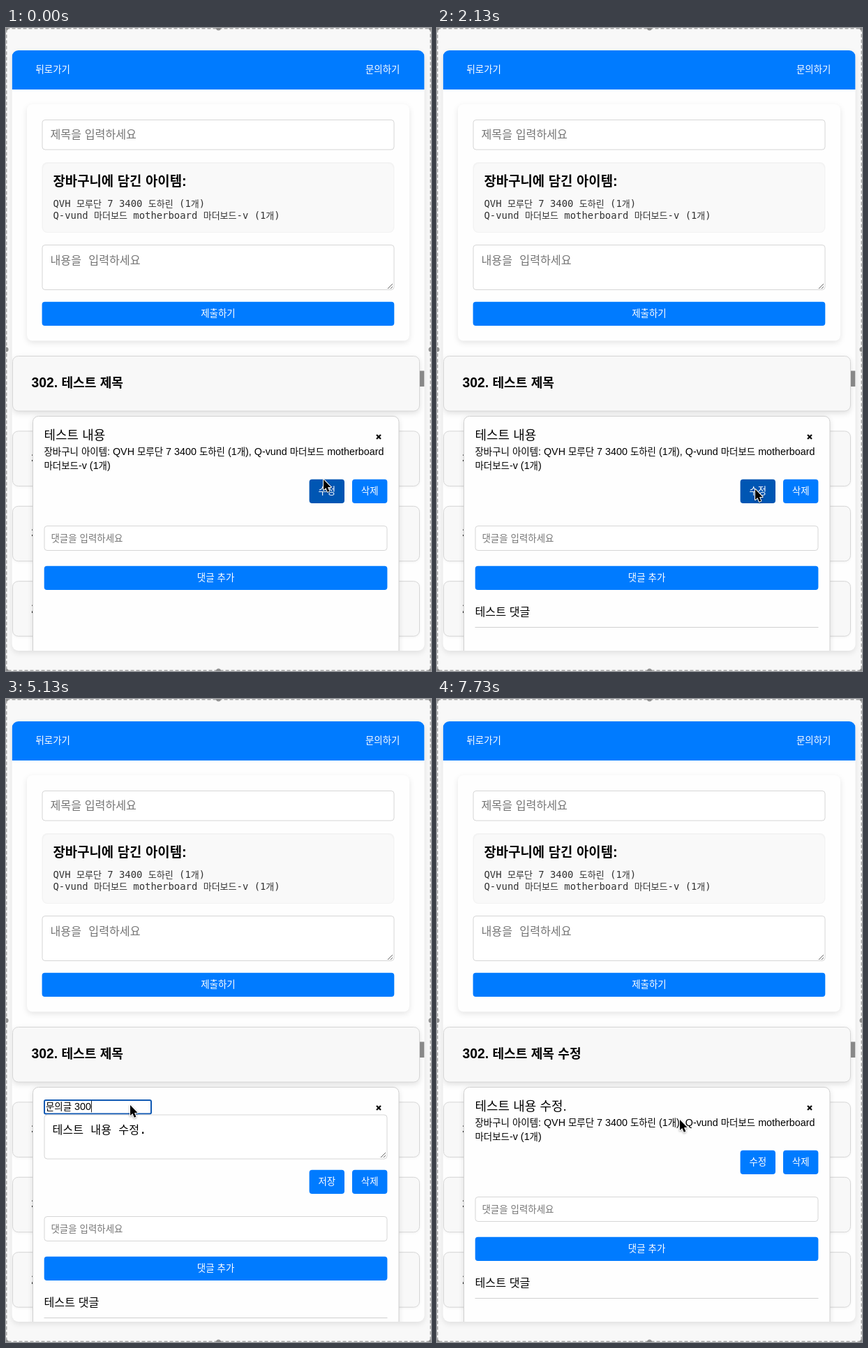
Animation of 609 by 920 pixels, one loop 8 s. Source, as an HTML page with a canvas:

```html
<!DOCTYPE html>
<html lang="ko">
<head>
<meta charset="utf-8">
<title>문의 게시판</title>
<style>
  html, body { margin: 0; width: 100%; height: 100%; overflow: hidden; background: #f8f8f8; }
  canvas { display: block; width: 609px; height: 920px; }
</style>
</head>
<body>
<canvas id="stage"></canvas>
<script>
const canvas = document.getElementById('stage');
const dpr = window.devicePixelRatio || 1;
canvas.width = 609 * dpr;
canvas.height = 920 * dpr;
const c = canvas.getContext('2d');

const BLUE = '#007bff', RING = '#1059b3', LINE = '#d6d6d6', HINT = '#757575';
const BOARD = 'Q-vund 마더보드 motherboard';
const CART = ['QVH 모루단 7 3400 도하린 (1개)', BOARD + ' 마더보드-v (1개)'];
const OLD_BODY = '이것은 300번째 더미 ', OLD_WORD = '데이터입니다';

// All times are in ticks of 1/15 s.
const EDIT = 33, TITLE_FOCUS = 76, SAVE = 103, COMMENT = 20;

// Pointer moves: start tick, end tick, goal.
const HOME = [455, 646];
const MOVES = [
  [0, 5, 342, 732], [17, 20, 401, 779], [27, 28, 404, 714], [28, 31, 456, 660],
  [32, 36, 295, 618], [71, 76, 178, 581], [94, 96, 190, 614], [96, 101, 461, 695],
  [108, 111, 400, 690], [111, 114, 320, 530], [114, 116, 348, 602]
];

function pointerAt(k) {
  let [x, y] = HOME;
  for (const [start, end, gx, gy] of MOVES) {
    const p = Math.min(1, Math.max(0, (k - start) / (end - start)));
    const e = p * p * (3 - 2 * p);
    x += (gx - x) * e;
    y += (gy - y) * e;
  }
  return [x, y];
}

// A Korean keyboard's intermediate states: a new consonant first closes the open syllable before it.
const INITIALS = 'ㄱㄲㄴㄷㄸㄹㅁㅂㅃㅅㅆㅇㅈㅉㅊㅋㅌㅍㅎ';
const FINALS = ' ㄱㄲㄳㄴㄵㄶㄷㄹㄺㄻㄼㄽㄾㄿㅀㅁㅂㅄㅅㅆㅇㅈㅊㅋㅌㅍㅎ';
const GA = 0xac00;

function keystrokes(s) {
  const states = [];
  let done = '';
  for (const ch of s) {
    const n = ch.charCodeAt(0) - GA;
    if (n >= 0) {
      const lead = INITIALS[Math.floor(n / 588)];
      const prev = done.charCodeAt(done.length - 1) - GA;
      const open = prev >= 0 && prev % 28 === 0;
      states.push(open
        ? done.slice(0, -1) + String.fromCharCode(GA + prev + FINALS.indexOf(lead))
        : done + lead);
      if (n % 28) states.push(done + String.fromCharCode(GA + n - n % 28));
    }
    done += ch;
    states.push(done);
  }
  return states;
}

const REPLY = keystrokes('테스트 댓글');
const BODY = keystrokes('테스트 내용 수정');
const TITLE = keystrokes('테스트 제목 수정');

function typed(states, start, k, rate) {
  const i = Math.floor((k - start) * rate);
  return i < 0 ? '' : states[Math.min(i, states.length - 1)];
}

// Hangul and Latin runs use separate fonts and sizes.
function runs(s, size, o, visit) {
  let x = 0;
  for (const run of s.match(/[ㄱ-힣]+|[^ㄱ-힣]+/g) || []) {
    c.font = (o.bold ? 'bold ' : '') + (/[ㄱ-힣]/.test(run)
      ? size * .938 + 'px "Noto Sans CJK KR", "Noto Sans CJK", sans-serif'
      : size + (o.mono ? 'px "DejaVu Sans Mono", monospace' : 'px "Liberation Sans", sans-serif'));
    if (visit) visit(run, x);
    x += c.measureText(run).width;
  }
  return x;
}
const width = (s, size, o = {}) => runs(s, size, o);

// y is the middle of the glyphs.
function text(s, x, y, size, color = '#000', o = {}) {
  if (o.center) x -= width(s, size, o) / 2;
  c.fillStyle = color;
  runs(s, size, o, (run, dx) => c.fillText(run, x + dx, y + size * .33));
}

function box(x, y, w, h, r, fill, stroke, line = 1) {
  c.beginPath();
  c.roundRect(x, y, w, h, r);
  if (fill) { c.fillStyle = fill; c.fill(); }
  c.shadowColor = 'transparent';
  if (stroke) { c.strokeStyle = stroke; c.lineWidth = line; c.stroke(); }
}

function shadow(alpha, blur, dy) {
  c.shadowColor = `rgba(0,0,0,${alpha})`;
  c.shadowBlur = blur * dpr;
  c.shadowOffsetY = dy * dpr;
}

function rule(x1, y1, x2, y2, color, line = 1) {
  c.beginPath();
  c.moveTo(x1, y1);
  c.lineTo(x2, y2);
  c.strokeStyle = color;
  c.lineWidth = line;
  c.stroke();
}

function field(x, y, w, h, focus, border = LINE, r = 4) {
  if (focus) box(x + .5, y + .5, w - 1, h - 1, r, '#fff', RING, 2);
  else box(x + .5, y + .5, w - 1, h - 1, r, '#fff', border);
}

function grip(x, y) {
  rule(x - 9, y - 2, x - 2, y - 9, '#666');
  rule(x - 5, y - 2, x - 2, y - 5, '#666');
}

// Hover fades over two ticks; dy is how far the layout is pushed down.
function button(label, x, y, w, k, dy = 0) {
  const over = t => {
    const [px, py] = pointerAt(t);
    return px > x && px < x + w && py > y + dy && py < y + dy + 34;
  };
  const hover = (over(k) + over(k - 1)) / 2;
  box(x, y, w, 34.4, 4, `rgb(0,${123 - 37 * hover},${255 - 76 * hover})`);
  text(label, x + w / 2, y + 16.7, 14.33, '#fff', { center: true });
}

// Text entry with a caret and an underline below the syllable being composed.
function entry(s, x, y, size, o, caret, composing) {
  text(s, x, y, size, '#000', o);
  const end = x + width(s, size, o);
  if (composing && /[ㄱ-힣]$/.test(s))
    rule(end - size * .863, y + size * .55, end, y + size * .55, '#2a70c8', 1.5);
  if (caret) rule(end + .5, y - size * .58, end + .5, y + size * .58, '#222');
}

function page(k) {
  box(8.6, 32, 591, 56, 0, BLUE);
  text('뒤로가기', 42.5, 59.3, 14.33, '#fff');
  text('문의하기', 515, 59.3, 14.33, '#fff');

  shadow(.1, 9, 3);
  box(30, 109, 548, 338.5, 8, '#fefefe');
  field(51.5, 131, 505, 43.5);
  text('제목을 입력하세요', 63.5, 152.5, 17.2, HINT);
  box(51.5, 192, 505, 101, 8, '#f3f3f3');
  box(53, 194, 502, 98, 7, '#f9f9f9');
  text('장바구니에 담긴 아이템:', 67.5, 219, 20.1, '#000', { bold: true });
  CART.forEach((s, i) => text(s, 67.5, 251 + 17.5 * i, 13.9, '#333', { mono: true }));
  field(51.5, 310, 505, 65);
  text('내용을 입력하세요', 63.5, 332, 17.2, HINT, { mono: true });
  grip(556, 375);
  button('제출하기', 51.6, 391.7, 504.7, k);

  ['302. 테스트 제목' + (k >= SAVE ? ' 수정' : ''), '301.', '300.', '299.'].forEach((s, i) => {
    const y = 469.5 + 107.4 * i;
    shadow(i ? .06 : .13, i ? 4 : 8, i ? 1 : 3);
    box(9.5, y, 583, 78.5, 8, '#f8f8f8', LINE);
    text(s, 36.5, y + 38.5, 19.3, '#000', { bold: true });
  });
  c.fillStyle = '#888';
  c.fillRect(593, 490.5, 6.5, 22.5);
}

function viewer(k) {
  text('테스트 내용' + (k >= SAVE ? ' 수정.' : ''), 54.5, 583, 19.1);
  text(`장바구니 아이템: ${CART[0]}, ${BOARD}`, 54.5, 606, 14.33);
  text('마더보드-v (1개)', 54.5, 626.5, 14.33);
}

function editor(k) {
  const mono = { mono: true }, size = 17.2, x = 66.5, y = 616;
  const inTitle = k >= TITLE_FOCUS, inBody = k >= 37 && !inTitle;
  const titleRing = inTitle && k < SAVE - 1;

  field(54.5, 573.5, 154, 20.5, titleRing, '#767676', 2);
  const title = k < 83 ? '문의글 300' : typed(TITLE, 85, k, 1.75);
  entry(title, 57, 583, 14.33, {}, inTitle && k < 95, k >= 85);

  field(54.5, 594.5, 492, 64, inBody);
  grip(546, 658);
  let head = OLD_BODY + OLD_WORD;
  if (k >= 54) head = typed(BODY, 54, k, 1);
  else if (k >= 44) head = OLD_BODY.slice(0, Math.max(0, 13 - Math.ceil((k - 44) * 1.45)));
  else if (k >= 38) {
    c.fillStyle = '#b3d6fb';
    c.fillRect(x + width(OLD_BODY, size, mono), 605, width(OLD_WORD, size, mono), 23);
  }
  entry(head, x, y, size, mono, inBody && k >= 44, inBody && k >= 54);
  text('.', x + width(head, size, mono), y, size, '#000', mono);
}

function panel(k) {
  const editing = k >= EDIT && k < SAVE, dy = editing ? 28 : 0;
  shadow(.12, 8, 2);
  box(38.5, 555.5, 524.5, 380, 8, '#fefefe', '#d0d0d0');
  rule(531, 582, 537, 588, '#111', 2.3);
  rule(537, 582, 531, 588, '#111', 2.3);
  if (editing) editor(k); else viewer(k);

  c.save();
  c.translate(0, dy);
  button(editing ? '저장' : '수정', 434.6, 645.7, 50.4, k, dy);
  button('삭제', 496, 645.7, 50.4, k, dy);
  const focus = k >= 6 && k < COMMENT;
  const reply = focus ? typed(REPLY, 7, k, 1.75) : '';
  field(54.5, 712, 492, 36, focus);
  if (!reply) text('댓글을 입력하세요', 64.5, 730, 14.33, HINT);
  if (focus) entry(reply, 64.5, 730, 14.33, {}, true, k < 17);
  button('댓글 추가', 54.7, 769.7, 491.7, k, dy);
  if (k >= COMMENT) {
    text('테스트 댓글', 54.5, 835, 17.2);
    rule(54.5, 857.5, 546.5, 857.5, '#d0d0d0');
  }
  c.restore();
}

function pointer(k) {
  const typing = k >= 7 && k < 17 || k >= 44 && k < 72 || k >= 83 && k < 95;
  if (typing) return;
  c.save();
  c.translate(...pointerAt(k));
  c.beginPath();
  [[0, 0], [0, 15], [3.4, 12], [5.8, 17.8], [8.4, 16.7], [6, 11], [10.6, 11]].forEach(p => c.lineTo(...p));
  c.closePath();
  c.lineJoin = 'round';
  c.lineWidth = 2;
  c.strokeStyle = '#fff';
  shadow(.35, 3, 1);
  c.stroke();
  c.shadowColor = 'transparent';
  c.fillStyle = '#000';
  c.fill();
  c.restore();
}

function frame() {
  c.setLineDash([5, 3]);
  c.strokeStyle = '#aaa';
  c.lineWidth = 2;
  c.strokeRect(.5, .5, 608, 919);
  c.setLineDash([]);
  c.fillStyle = '#909090';
  for (const x of [0, 304.5, 609]) for (const y of [0, 460, 920]) {
    if (x === 304.5 && y === 460) continue;
    c.beginPath();
    c.arc(x, y, 3.5, 0, 7);
    c.fill();
  }
}

function draw(now) {
  const k = Math.floor(now % 8000 * .015 + .06);
  c.setTransform(dpr, 0, 0, dpr, 0, 0);
  c.fillStyle = '#f8f8f8';
  c.fillRect(0, 0, 609, 920);
  shadow(.1, 9, 3);
  box(8.6, 32, 591, 859, 9, '#fefefe');
  c.save();
  c.beginPath();
  c.roundRect(8.6, 32, 591, 859, 9);
  c.clip();
  page(k);
  panel(k);
  c.restore();
  pointer(k);
  frame();
  requestAnimationFrame(draw);
}
requestAnimationFrame(draw);
</script>
</body>
</html>
```
